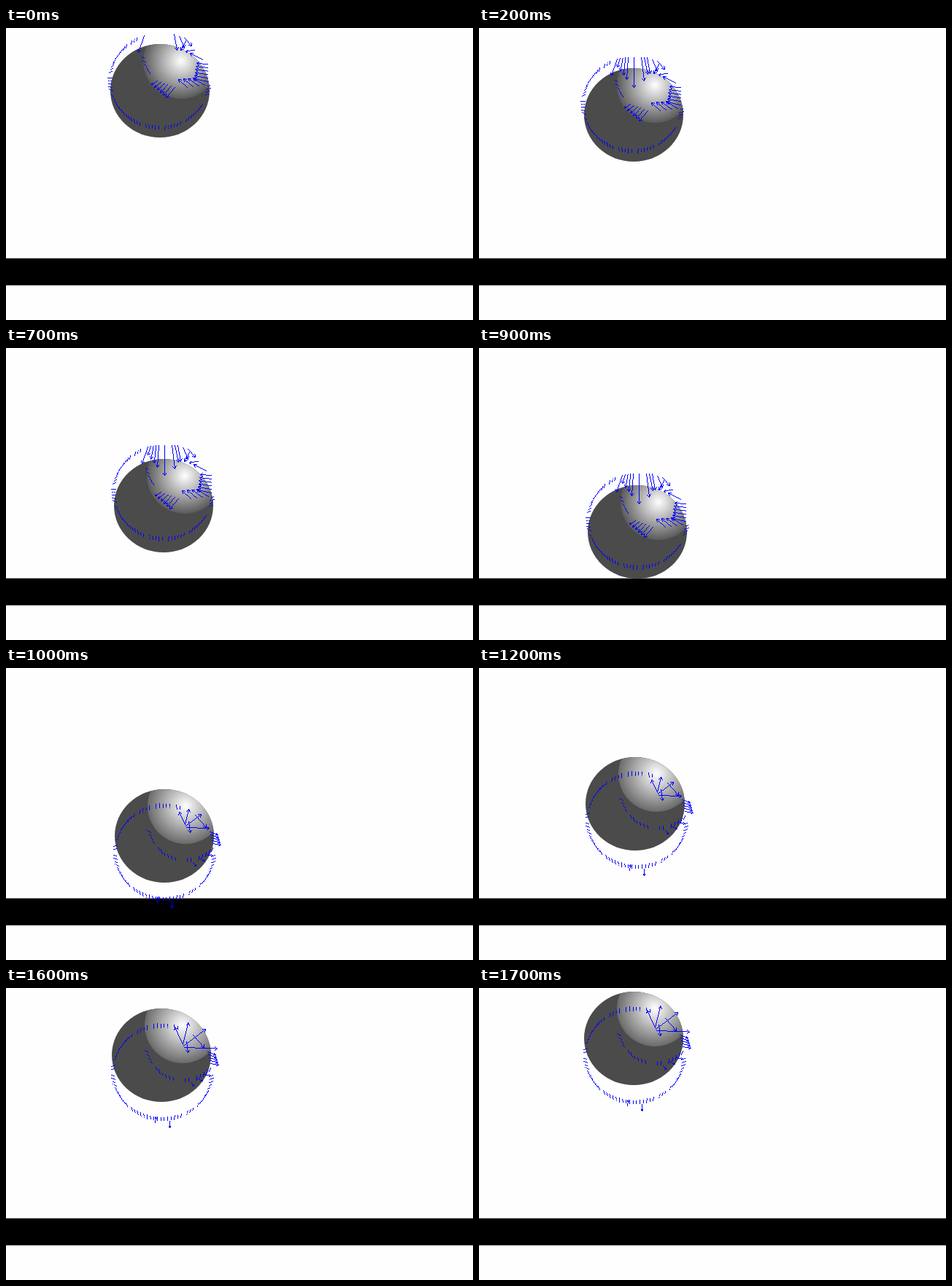
An HTML page with a canvas for the animation above (1.8 s loop, 640x400 px).

```html
<!DOCTYPE html>
<html>
<head>
<meta charset="utf-8">
<style>
html, body { margin: 0; width: 100%; height: 100%; overflow: hidden; background: #fefefe; }
canvas { display: block; }
</style>
</head>
<body>
<canvas id="stage" width="640" height="400"></canvas>
<script>
const ctx = document.getElementById('stage').getContext('2d');
const RX = 68, RY = 64, LIT_R = 52, LIT_X = 29, LIT_Y = 23;
const STEP = 100, STEPS = 18, BOUNCE = 9;

// Key points of the ball path: step, centre x, top y.
const path = [[0, 211, 22], [1, 210, 40], [2, 212, 55], [4, 214, 91], [5, 214, 113],
  [8, 217, 172], [9, 217, 188], [11, 216, 144], [12, 214, 122], [14, 214, 74],
  [16, 213, 28], [17, 212, 5]];

const mix = (a, b, t) => a + (b - a) * t;

function ballAt(k) {
  const i = Math.max(1, path.findIndex(p => p[0] >= k));
  const [k0, x0, y0] = path[i - 1], [k1, x1, y1] = path[i];
  const t = (k - k0) / (k1 - k0);
  return { x: Math.round(mix(x0, x1, t)), top: Math.round(mix(y0, y1, t)) };
}

function seeded(seed) {
  return () => (seed = (seed * 16807) % 2147483647) / 2147483647;
}

function line(x1, y1, x2, y2) {
  const n = Math.max(1, Math.round(Math.max(Math.abs(x2 - x1), Math.abs(y2 - y1))));
  for (let i = 0; i <= n; i++) {
    ctx.fillRect(Math.round(mix(x1, x2, i / n)), Math.round(mix(y1, y2, i / n)), 1, 1);
  }
}

function arrow(x, y, dx, dy) {
  const angle = Math.atan2(dy, dx), size = Math.min(4, Math.hypot(dx, dy) * 0.25);
  line(x, y, x + dx, y + dy);
  for (const side of [-0.6, 0.6]) {
    line(x + dx, y + dy, x + dx - size * Math.cos(angle + side), y + dy - size * Math.sin(angle + side));
  }
}

// Row of arrows blended from one [x, y, dx, dy] to another.
function fan(count, from, to = from) {
  for (let i = 0; i < count; i++) {
    arrow(...from.map((v, j) => mix(v, to[j], count > 1 ? i / (count - 1) : 0)));
  }
}

// Short marks along an arc, leaning against its normal, with random gaps.
function ticks(x, y, rx, ry, from, to, step, random) {
  for (let deg = from; deg <= to; deg += step) {
    const a = deg * Math.PI / 180, c = Math.cos(a), s = Math.sin(a);
    const lean = Math.atan2(-s, 0.45 * c), half = mix(1.5, 3, random());
    if (random() < 0.12) continue;
    const dx = half * Math.cos(lean), dy = half * Math.sin(lean);
    line(x + rx * c - dx, y + ry * s - dy, x + rx * c + dx, y + ry * s + dy);
  }
}

function drawFloor() {
  ctx.fillStyle = '#8a8286';
  ctx.fillRect(0, 315, 640, 38);
  ctx.fillStyle = '#000';
  ctx.fillRect(0, 316, 640, 36);
}

function drawBall({ x, top }, rising) {
  const lx = x + LIT_X, ly = top + LIT_Y;
  ctx.save();
  ctx.beginPath();
  ctx.ellipse(x, top + RY, RX, RY, 0, 0, 2 * Math.PI);
  ctx.fillStyle = '#4b4b4b';
  ctx.fill();
  ctx.clip();
  const light = ctx.createRadialGradient(lx, ly, 0, lx, ly, LIT_R);
  light.addColorStop(0, '#fff');
  light.addColorStop(1, rising ? '#6a6a6a' : '#5a5a5a');
  ctx.fillStyle = light;
  ctx.beginPath();
  ctx.arc(lx, ly, LIT_R, 0, 2 * Math.PI);
  ctx.fill();
  ctx.restore();
}

function fallFlow(random, started) {
  ticks(0, RY, RX, RY, 6, 246, 3.7, random);
  ticks(LIT_X, LIT_Y, LIT_R, LIT_R, 146, 174, 6, random);
  fan(1, [-21, 2, -8, 23]);
  if (started) {
    fan(4, [-17, 1, -4, 12], [-6, 0, -2, 30]);
    fan(1, [2, 0, 0, 41]);
    fan(2, [12, 0, 4, 32], [16, 0, 5, 23]);
  }
  fan(3, [20, 0, 4, 22], [34, 5, 10, 11]);
  fan(3, [37, 8, -8, 14], [59, 35, -17, -9]);
  fan(6, [66, 41, -15, -1], [66, 65, -19, -4]);
  fan(4, [38, 73, -12, -11], [62, 70, -16, -10]);
  fan(6, [21, 73, -12, 14], [-3, 64, -8, 5]);
}

function riseFlow(random, growth) {
  ticks(0, RY, RX, RY, 4, 292, 4, random);
  ticks(LIT_X, LIT_Y, LIT_R, LIT_R, 40, 170, 6, random);
  for (let i = 0; i < 4; i++) {
    const angle = (-115 + 39 * i) * Math.PI / 180, length = (24 + 7 * i) * growth;
    arrow(27 + i, 24 + 2 * i, length * Math.cos(angle), length * Math.sin(angle));
  }
  fan(2, [33, 22, 2, 15], [42, 13, 15, 17]);
  fan(5, [62, 36, 11, 4], [66, 52, 11, 2]);
  fan(3, [39, 78, 4, 5], [56, 67, 10, 2]);
  fan(2, [-10, 133, 1, -8], [10, 131, 0, 9]);
}

function draw(k) {
  const rising = k > BOUNCE, ball = ballAt(k);
  const before = k ? ballAt(k - 1) : { x: 210, top: 8 };
  ctx.fillStyle = '#fefefe';
  ctx.fillRect(0, 0, 640, 400);
  drawFloor();
  drawBall(ball, rising);

  // The flow starts on the outline of the previous step.
  ctx.save();
  ctx.translate(before.x, before.top);
  ctx.fillStyle = '#00f';
  if (rising) riseFlow(seeded(71), Math.min(1, 0.7 + Math.max(0, k - 12) * 0.08));
  else fallFlow(seeded(29), k > 0);
  ctx.restore();
}

function tick() {
  draw(Math.floor(performance.now() / STEP) % STEPS);
  requestAnimationFrame(tick);
}
tick();
</script>
</body>
</html>
```
